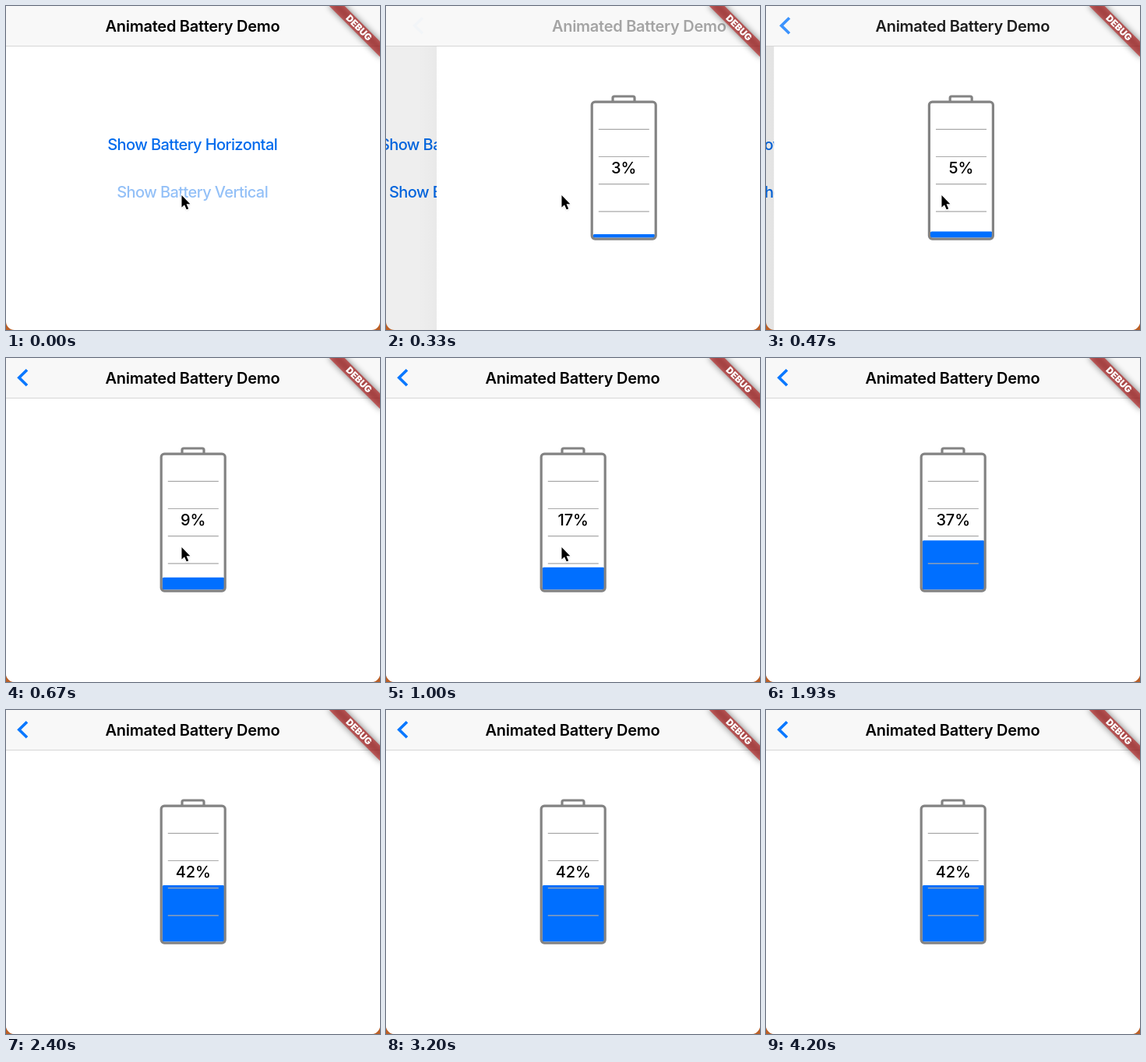
Animation, 480 px wide and 416 px high, one loop 4670 ms. Source, as an HTML page:

```html
<!DOCTYPE html>
<html lang="en">
<head>
<meta charset="utf-8">
<title>Animated Battery Demo</title>
<style>
  html, body { margin: 0; width: 100%; height: 100%; overflow: hidden; background: #fff; }
  svg { display: block; width: 480px; height: 416px; }
  text { font: 450 20px Inter, Roboto, sans-serif; text-anchor: middle; }
  .title { font-weight: 600; letter-spacing: -.27px; }
  .link { fill: #006bed; letter-spacing: -.58px; }
  .level { letter-spacing: -.1px; }
  .banner { font-size: 11.9px; font-weight: 900; fill: #fff; }
  .case { fill: none; stroke: #838383; stroke-width: 3.2; }
</style>
</head>
<body>
<svg viewBox="0 0 480 416">
  <defs>
    <clipPath id="window"><path d="M0 0H480V405a11 11 0 0 1-11 11H11a11 11 0 0 1-11-11Z"/></clipPath>
    <linearGradient id="edge">
      <stop offset="0" stop-opacity="0"/>
      <stop offset="1" stop-opacity=".02"/>
    </linearGradient>
    <filter id="blur" x="-30%" y="-200%" width="160%" height="500%"><feGaussianBlur stdDeviation="4.4"/></filter>
    <filter id="soft" x="-50%" y="-50%" width="200%" height="200%"><feGaussianBlur stdDeviation="1"/></filter>
  </defs>
  <rect width="480" height="416" fill="#bb5f26"/>
  <g clip-path="url(#window)">
    <rect width="480" height="416" fill="#fff"/>
    <g id="home">
      <text class="link" x="239.2" y="185">Show Battery Horizontal</text>
      <text class="link" id="pressed" x="239.2" y="246">Show Battery Vertical</text>
    </g>
    <rect id="barrier" width="480" height="416"/>

    <g id="page">
      <rect x="-24" width="24" height="416" fill="url(#edge)"/>
      <rect width="480" height="416" fill="#fff"/>
      <rect id="fill" x="200.8" width="79.4" rx="1.5" fill="#006fff"/>
      <path d="M207.8 158.3h65m-65 35.2h65m-65 35.2h65m-65 35.2h65" stroke="#a9a9a9" stroke-width="1.2"/>
      <rect class="case" x="199.2" y="123.1" width="82" height="176" rx="4"/>
      <path class="case" d="M226 122.5v-4.5q0-2 2-2h24q2 0 2 2v4.5"/>
      <text class="level" id="level" x="240.2" y="215"></text>
    </g>

    <rect width="480" height="51" fill="#f8f8f8"/>
    <rect y="51" width="480" height="1" fill="#d6d6d6"/>
    <text class="title" id="oldTitle" x="239.5" y="33">Animated Battery Demo</text>
    <text class="title" id="newTitle" x="239.5" y="33">Animated Battery Demo</text>
    <path id="back" d="M27 15.2 16.8 25.2 27 35.2" fill="none" stroke="#0a78ff" stroke-width="3.7"/>

    <g transform="translate(481 0) rotate(45)">
      <rect x="-46.8" y="32.8" width="93.6" height="14" opacity=".5" filter="url(#blur)"/>
      <rect x="-46.8" y="32.8" width="93.6" height="14" fill="#b71c1c" fill-opacity=".627"/>
      <text class="banner" y="43.8">DEBUG</text>
    </g>

    <g id="cursor" transform="translate(225 242.5) scale(.95)">
      <path d="M0 1V18l4-3.6 3 6.6 3-1.3-2.9-6.4h5.4z" opacity=".3" filter="url(#soft)"/>
      <path d="M.5.5V16.8l3.7-3.5 2.9 6.5 2.6-1.1-2.8-6.3h5z" stroke="#fff" stroke-width="2.4" paint-order="stroke"/>
    </g>
  </g>
</svg>
<script>
const LOOP = 4670, STEP = 1000 / 15;
const PUSH = { start: 150, length: 441 };
const CURSOR_HIDES = 1300;
// [time in ms, charge in percent]
const CHARGE = [[200, 0], [333, 2.55], [467, 4.7], [1000, 16.7], [1600, 29.65], [2190, 42]];

const el = Object.fromEntries([...document.querySelectorAll("svg [id]")].map(e => [e.id, e]));
const clamp = v => Math.min(1, Math.max(0, v));

function bezier(x1, y1, x2, y2) {
  const at = (s, a, b) => 3 * (1 - s) ** 2 * s * a + 3 * (1 - s) * s * s * b + s ** 3;
  return x => {
    let lo = 0, hi = 1;
    for (let i = 0; i < 24; i++) {
      const mid = (lo + hi) / 2;
      if (at(mid, x1, x2) < x) lo = mid; else hi = mid;
    }
    return x <= 0 ? 0 : x >= 1 ? 1 : at(lo, y1, y2);
  };
}
const slideCurve = bezier(.35, .91, .33, .97);
const barCurve = bezier(.4, 0, .2, 1);
const ease = bezier(.25, .1, .25, 1);

const fadeIn = (p, from) => clamp((p - from) / (1 - from)) ** 1.7;

function charge(t) {
  const i = CHARGE.findIndex(k => k[0] > t);
  if (i < 0) return CHARGE.at(-1)[1];
  if (i === 0) return 0;
  const [t0, v0] = CHARGE[i - 1], [t1, v1] = CHARGE[i];
  return v0 + (v1 - v0) * (t - t0) / (t1 - t0);
}

const set = (node, name, value) => node.setAttribute(name, value);
const shift = (node, x) => set(node, "transform", `translate(${x.toFixed(2)} 0)`);
const fade = (node, v) => set(node, "opacity", v.toFixed(3));

function draw(t) {
  const q = clamp((t - PUSH.start) / PUSH.length);
  const slide = slideCurve(q), bar = barCurve(q);

  shift(el.home, -160 * slide);
  fade(el.pressed, clamp(.42 + t / 160));
  fade(el.barrier, .094 * ease(q));
  shift(el.page, 480 * (1 - slide));
  set(el.page, "visibility", q > 0 ? "visible" : "hidden");

  fade(el.oldTitle, clamp(1 - bar / .4));
  shift(el.newTitle, 240 * (1 - bar));
  fade(el.newTitle, fadeIn(bar, .25));
  shift(el.back, 56 * (1 - bar));
  fade(el.back, fadeIn(bar, .6));

  const percent = charge(t), height = percent * 1.726;
  set(el.fill, "y", 297.5 - height);
  set(el.fill, "height", height);
  el.level.textContent = Math.round(percent) + "%";
  fade(el.cursor, t < CURSOR_HIDES ? 1 : 0);
}

const origin = performance.now();
function tick() {
  const ms = (performance.now() - origin) % LOOP;
  draw(Math.min(69, Math.floor((ms + 4) / STEP)) * STEP);
  requestAnimationFrame(tick);
}
tick();
</script>
</body>
</html>
```
